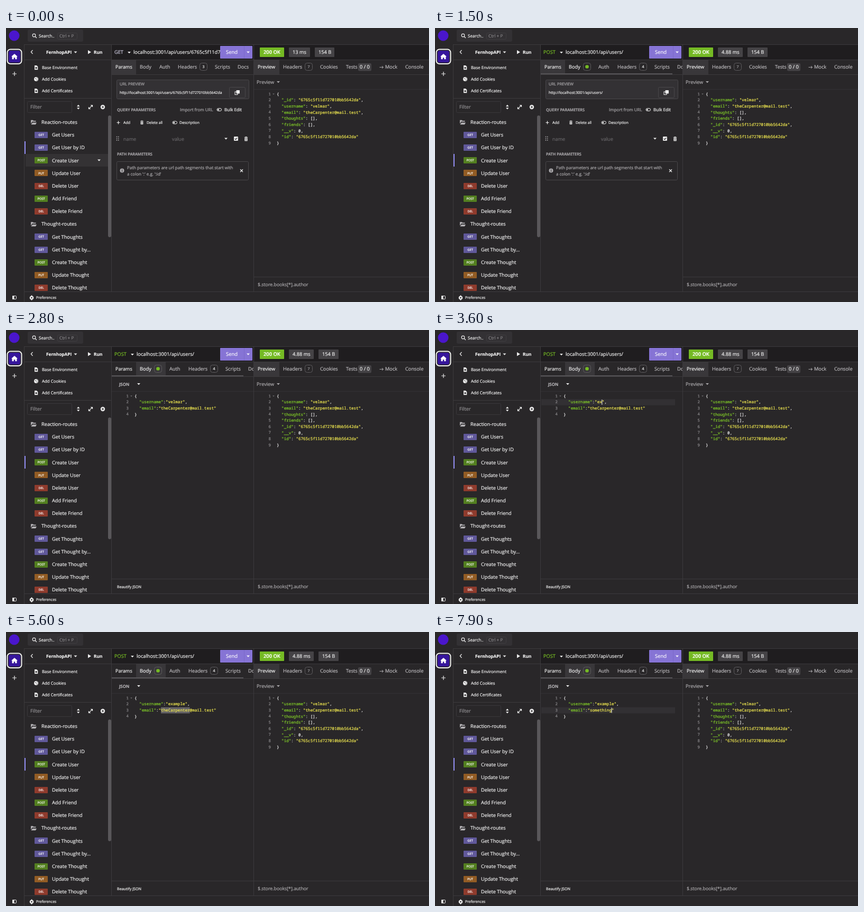
Write an HTML page that moves like this. It is 800x520 px and loops after 8000 ms.

```html
<!DOCTYPE html>
<html lang="en">
<head>
<meta charset="utf-8">
<title>API client</title>
<style>
  html, body { margin: 0; width: 100%; height: 100%; overflow: hidden; background: #292729; }
  svg { display: block; width: 800px; height: 520px; }
  text { font-family: "Open Sans", "Noto Sans", sans-serif; text-rendering: geometricPrecision; stroke-width: .22px; }
  .code { font-family: "Noto Sans Mono", "DejaVu Sans Mono", monospace; }
</style>
</head>
<body>
<svg id="stage" viewBox="0 0 800 520" xmlns="http://www.w3.org/2000/svg"></svg>
<script>
const LOOP = 8000;
const BG = '#292729', BAR = '#1f1d1f', LINE = '#3c3a3d', TEXT = '#ececec', DIM = '#a9a7aa', FAINT = '#666467';
const GREEN = '#75ba24', KEY = '#80cb28', YELLOW = '#f0e850';
const CHAR = 4.55, ROW = 11.65;
const ID = '6765c5f11d727010bb5642da';
const USER = 'velmar', MAIL = 'theCarpenter@mail.test';
const BASE = 'localhost:3001/api/users/';

// y is the middle of the capitals; the thin stroke gives the strong screen weight
const text = (x, y, s, size = 9.24, fill = TEXT, more = '') =>
  `<text x="${x}" y="${y + size * 0.357}" font-size="${size}" fill="${fill}" stroke="${fill}" ${more}>${s}</text>`;
const rect = (x, y, w, h, fill, r = 0, more = '') =>
  `<rect x="${x}" y="${y}" width="${w}" height="${h}" rx="${r}" fill="${fill}" ${more}/>`;
const frameBox = (x, y, w, h, r = 2, fill = 'none', stroke = '#49474a') =>
  rect(x + .5, y + .5, w - 1, h - 1, fill, r, `stroke="${stroke}"`);
const path = (d, stroke = TEXT, width = 1.2, fill = 'none') =>
  `<path d="${d}" stroke="${stroke}" stroke-width="${width}" fill="${fill}"/>`;
const solid = (d, fill = TEXT) => `<path d="${d}" fill="${fill}"/>`;
const dot = (x, y, r, fill = TEXT) => `<circle cx="${x}" cy="${y}" r="${r}" fill="${fill}"/>`;
const caret = (x, y, fill = TEXT, r = 3) =>
  solid(`M${x - r} ${y - r / 2}h${2 * r}l${-r} ${r * 1.1}z`, fill);
const hline = (x, y, w, fill = LINE) => rect(x, y, w, 1, fill);
const vline = (x, y, h) => rect(x, y, 1, h, LINE);
const group = (id, body) => `<g id="${id}">${body}</g>`;
const bold = 'font-weight="700"', semi = 'font-weight="600"', medium = 'font-weight="500"';

const paint = s => s.replace(/"[^"]*"(?=(:?))/g, (q, colon) => {
  const c = colon ? KEY : YELLOW;
  return `<tspan fill="${c}" stroke="${c}">${q}</tspan>`;
});

function code(x, lines, id = '') {
  return lines.map((s, i) => {
    const y = 124.9 + i * ROW, indent = i && i < lines.length - 1 ? 2 * CHAR : 0;
    return text(x - 11, y, i + 1, 7.3, '#8b898c', 'class="code" text-anchor="end"') +
      text(x + indent, y, paint(s), 7.58, TEXT, `class="code" ${id && `id="${id}${i}"`}`);
  }).join('');
}

function badge(x, s, fill = TEXT) {
  return frameBox(x, 66, 15, 15, 4, 'none', '#5c5a5d') +
    (s ? text(x + 7.5, 73.5, s, 7, fill, 'text-anchor="middle"') : dot(x + 7.5, 73.5, 3.3, GREEN));
}

function toggle(x, y) {
  return rect(x - 4, y - 2.5, 8.5, 5, 'none', 2.5, `stroke="${TEXT}"`) + dot(x - 1.3, y, 1.5);
}

function trash(x, y, s = 1) {
  return `<g transform="translate(${x} ${y}) scale(${s})">` +
    rect(-3.5, -4, 7, 1.3, TEXT) + rect(-1.2, -5, 2.4, 1, TEXT) +
    rect(-3, -2, 6, 6.5, TEXT, 1) + path('M-1-1v4.5M1-1v4.5', BG, .7) + '</g>';
}

function rail() {
  return dot(15.5, 14.5, 10, '#4a16cc') +
    rect(2.5, 40.5, 27, 27.5, BG, 6, 'stroke="#f2f2f4" stroke-width="2"') +
    rect(5, 43, 22, 22.5, '#36169c', 3.5) +
    solid('M16 49l6 5.3h-1.5v5h-3.2v-3h-2.6v3h-3.2v-5h-1.5z', '#fff') +
    path('M12 87h8M16 83v8') +
    frameBox(12, 508, 8, 7, 1, 'none', TEXT) + rect(12, 508, 3.5, 7, TEXT, 1);
}

function topBar() {
  return rect(41, 3, 105, 23, '#333134', 3) +
    `<circle cx="53" cy="14" r="2.8" fill="none" stroke="${TEXT}" stroke-width="1.2"/>` + path('M55 16l3 3') +
    text(62, 15, 'Search..', 8.1) + frameBox(97, 9, 38, 13, 2, 'none', '#3f3d40') +
    text(101, 15.5, 'Ctrl + P', 8.2, '#858386');
}

function sidebar() {
  const colors = { GET: '#60589a', POST: '#537f20', PUT: '#925c24', DEL: '#8f3b2d' };
  const rows = ['Reaction-routes', 'GET Get Users', 'GET Get User by ID', 'POST Create User',
    'PUT Update User', 'DEL Delete User', 'POST Add Friend', 'DEL Delete Friend',
    'Thought-routes', 'GET Get Thoughts', 'GET Get Thought by...', 'POST Create Thought',
    'PUT Update Thought', 'DEL Delete Thought'];
  const list = rows.map((row, i) => {
    const y = 178.8 + i * 24.17, [, verb, name] = row.match(/^(?:([A-Z]+) )?(.*)$/);
    if (!verb) {
      return solid(`M47 ${y - 4}h4l1 1.3h4.5v1.7h-7l-2.5 4zM50 ${y + .8}h8l-2 3.6h-8.5z`, '#b5b3b6') +
        text(67, y, name);
    }
    return rect(54, Math.round(y - 6), 25, 12, colors[verb], 1) +
      text(66.6, y, verb, 5.7, '#fff', 'text-anchor="middle"') + text(87, y, name);
  }).join('');

  const page = y => solid(`M54 ${y - 4}h4l2.3 2.3v6h-6.3z`) + rect(55.5, y - .5, 3.2, 2.6, BG);
  return path('M50.5 42l-3.2 3.5 3.2 3.5') + text(76, 46, 'FernhopAPI', 8.3, TEXT, bold) + caret(131.5, 46) +
    solid('M155 42l6 3.8-6 3.8z') + text(166, 46, 'Run', 8.4, TEXT, bold) +
    page(75) + text(68, 75, 'Base Environment', 7.9, TEXT, medium) +
    dot(57, 97, 4) + dot(55.7, 96, .8, BG) + dot(58.5, 98.5, .8, BG) + dot(58.8, 95, .7, BG) +
    text(68, 97, 'Add Cookies', 7.9, TEXT, medium) +
    page(119) + text(68, 119, 'Add Certificates', 7.9, TEXT, medium) +
    frameBox(40, 139, 85, 22, 2, 'none', '#3a383b') + text(46, 150, 'Filter', 9.24, '#8f8d90') +
    solid('M134 149l2.8-3.4 2.8 3.4zM134 151.200l2.8 3.4 2.8-3.4z') +
    path('M157 153l6-6M160 146.500h3.500v3.500M156.500 150v3.500h3.500') +
    dot(183, 150, 4.2) + path('M180.800 150h4.400M183 147.800v4.400', BG, 1.1) +
    hline(35, 60, 165) + hline(35, 133, 165) +
    `<g clip-path="url(#listClip)">` +
    rect(37, 215, 156, 24, '#fff', 0, 'id="rowGet" opacity="0"') +
    rect(37, 239, 156, 24, '#fff', 0, 'id="rowCreate" opacity="0"') +
    rect(35, 215, 2, 24, '#8f8af0', 0, 'id="barGet"') +
    rect(35, 239, 2, 24, '#8f8af0', 0, 'id="barCreate"') +
    list + group('rowCaret', caret(176, 251)) + '</g>' +
    rect(193, 166, 6, 231, '#59575a', 3);
}

function request() {
  const tab = (x, s) => text(x, 74, s, 9.24, '#b9b7ba');
  const getHead = text(205, 46, 'GET', 9.24, '#cbc8dc') + caret(233, 46.5) + text(241, 46, BASE + ID.slice(0, 11)) +
    tab(253, 'Body') + tab(290, 'Auth') + tab(325, 'Headers') + badge(366, '3') +
    tab(395, 'Scripts') + tab(438, 'Docs');
  const postHead = text(205, 46, 'POST', 9.24, GREEN) + caret(239, 46.5) + text(247, 46, BASE) +
    tab(309, 'Auth') + tab(345, 'Headers') + badge(386, '4') + tab(415, 'Scripts') + tab(458, 'Docs') +
    text(253, 74, 'Body') + badge(280, '') + rect(200, 86, 249, 2, '#555356');

  const params = frameBox(209, 98, 251, 37, 2, '#333134') +
    text(215, 106, 'URL PREVIEW', 7.5, '#a9a7aa') +
    group('previewGet', text(215, 123, 'http://' + BASE + ID, 6.85)) +
    group('previewPost', text(215, 123, 'http://' + BASE, 6.95)) +
    frameBox(422, 112, 31, 21) +
    group('copy', rect(433, 121, 5, 5.5, 'none', 0, `stroke="${TEXT}"`) + rect(435.5, 118, 6.5, 6.5, TEXT, 1)) +
    text(210, 155, 'QUERY PARAMETERS', 7.4, '#b0aeb1', semi) + text(329, 155.500, 'Import from URL', 8, DIM) +
    toggle(403, 155) + text(413, 155.500, 'Bulk Edit', 8.1) +
    path('M209.500 179.500h6M212.500 176.500v6') + text(222, 179.500, 'Add', 7) +
    trash(257, 179.500, .8) + text(266, 179.500, 'Delete all', 6.95) +
    toggle(319, 179.500) + text(328, 179.500, 'Description', 7.1) +
    [206.5, 209.8, 213].map(y => dot(209.5, y, .9, DIM) + dot(212.7, y, .9, DIM)).join('') +
    text(222, 210.500, 'name', 9.1, FAINT) + text(314, 210.500, 'value', 9.24, FAINT) +
    caret(416, 210) + rect(431, 206, 8, 8, TEXT, 1.2) + path('M432.800 210l1.600 1.700 3-3.400', BG, 1.1) + trash(454, 210.500, .9) +
    text(210, 239, 'PATH PARAMETERS', 7.4, '#b0aeb1', semi) +
    frameBox(209, 253, 250, 36) +
    dot(219.5, 270.5, 4, DIM) + rect(219, 270, 1.1, 2.8, BG) + rect(219, 268, 1.1, 1.2, BG) +
    text(229, 265.500, 'Path parameters are url path segments that start with', 8, DIM) +
    text(229, 277.500, "a colon ':' e.g. ':id'", 8, DIM) +
    path('M443 268.200l5 5M448 268.200l-5 5', TEXT, 1.3);

  const body = text(214, 103, 'JSON', 7.9, '#c6c4c7', semi) + caret(251, 102.5) + hline(200, 116, 269, '#333134') +
    rect(201, 131, 253, 11.65, '#323033', 0, 'id="activeLine"') +
    rect(293, 131, 0, 11.65, '#646266', 0, 'id="selection"') +
    code(243, ['{', '"username":"' + USER + '",', '"email":"' + MAIL + '"', '}'], 'edit') +
    group('fold', caret(237, 125.5, '#777578', 1.8)) +
    rect(0, 132, 1, 10, '#f0f0f0', 0, 'id="cursor"') +
    hline(200, 472, 269) + text(210, 487, 'Beautify JSON', 7.15, TEXT, medium);

  return rect(200, 32, 269, 28, BAR) +
    rect(200, 61, 46, 27, '#39373a', 0, 'id="tabParams"') + rect(246, 61, 56, 27, '#39373a', 0, 'id="tabBody"') +
    text(207, 74, 'Params', 9.1) + group('getHead', getHead) + group('postHead', postHead) +
    group('params', params) + group('body', body) +
    rect(405, 34, 61, 24, '#8674d5', 1) + rect(450, 34, 1, 24, '#7b69c9') +
    text(416, 46, 'Send', 9.4, '#f4f2fb') + caret(458, 46, '#f4f2fb');
}

function response() {
  const quote = s => `"${s}"`;
  const who = ['"username": ' + quote(USER) + ',', '"email": ' + quote(MAIL) + ',', '"thoughts": [],', '"friends": [],'];
  const id = '"_id": ' + quote(ID) + ',', tail = ['"__v": 0,', '"id": ' + quote(ID), '}'];
  const chip = (x, w, s) => rect(x, 37, w, 18, '#454346', 1) + text(x + 7, 46, s);
  const tab = (x, s) => text(x, 74, s, 9.24, '#b9b7ba');
  return rect(469, 32, 331, 468, BG) + rect(469, 32, 331, 28, BAR) +
    rect(480, 37, 46, 18, GREEN, 1) + text(487, 46, '200 OK', 9.4, '#fff', semi) +
    rect(469, 61, 48, 27, '#39373a') + text(476, 74, 'Preview') +
    tab(524, 'Headers') + badge(565, '7', DIM) + tab(594, 'Cookies') + tab(643, 'Tests') +
    rect(666, 67, 25, 14.5, '#454346', 2) + text(669, 74, '0 / 0') +
    path('M706.500 74.500h7M711 72l2.500 2.500-2.500 2.500', '#b9b7ba', .9) + tab(717, 'Mock') + tab(755, 'Console') +
    text(474, 102.500, 'Preview', 9.24, DIM) + caret(515, 102.5, DIM) + hline(469, 116, 331, '#333134') +
    group('resGet', chip(535, 40, '13 ms') + chip(584, 37, '154 B') + code(512, ['{', id, ...who, ...tail])) +
    group('resPost', chip(535, 47, '4.88 ms') + chip(591, 38, '154 B') + code(512, ['{', ...who, id, ...tail])) +
    group('resFold', caret(506, 125.5, '#777578', 1.8)) +
    hline(469, 472, 331) + text(476, 487, '$.store.books[*].author', 8.75, DIM);
}

const stage = document.getElementById('stage');
stage.innerHTML = '<defs><clipPath id="listClip"><rect x="34" y="166" width="166" height="333"/></clipPath></defs>' +
  rect(0, 0, 800, 520, BG) + rail() + topBar() + sidebar() + request() + response() +
  hline(35, 31, 765) + hline(200, 60, 600) + hline(200, 88, 600) + hline(35, 500, 765) +
  vline(34, 31, 489) + vline(199, 31, 469) + vline(468, 31, 469) +
  solid('M45.500 509.500l2-1 .3-1.300h1.400l.3 1.300 2 1 .9 2.500-.9 2.500-2 1-.3 1.300h-1.400l-.3-1.300-2-1-.9-2.500z') +
  dot(48.5, 512, 1.3, BG) + text(57, 512, 'Preferences', 6.95);

const node = Object.fromEntries([...stage.querySelectorAll('[id]')].map(n => [n.id, n]));
const show = (id, on) => node[id].setAttribute('visibility', on ? 'inherit' : 'hidden');
const put = (id, attrs) => { for (const k in attrs) node[id].setAttribute(k, attrs[k]); };
// value of the last step already reached
const at = (steps, t) => steps.reduce((v, [time, next]) => t >= time ? next : v, steps[0][1]);

const rowCreate = [[0, .05], [400, .08], [600, .11], [900, .09], [1500, 0]];
const rowGet = [[0, 0], [500, .06], [600, .03], [700, 0]];
const pickUser = [[0, 0], [3100, 1], [3200, 3], [3300, 5], [3400, 6], [3500, 0]];
const pickMail = [[0, 0], [5300, 2], [5400, 5], [5500, 9], [5600, 12], [5700, 17], [5800, 20], [6000, 21], [6100, 22], [6700, 0]];
const userKeys = [3500, 3600, 3700, 3800, 3900, 4000, 4100];
const mailKeys = [6700, 6900, 7100, 7300, 7500, 7600, 7700, 7800, 7900];
const typed = (word, keys, before, t) =>
  t < keys[0] ? before : word.slice(0, keys.filter(k => t >= k).length);

function draw(t) {
  const post = t >= 500, body = t >= 1700;
  for (const id of ['getHead', 'previewGet', 'resGet']) show(id, !post);
  for (const id of ['postHead', 'previewPost', 'resPost']) show(id, post);
  show('params', !body);
  show('body', body);
  show('tabParams', !body);
  show('tabBody', t >= 1600);
  put('tabBody', { opacity: body ? 1 : .5 });
  put('copy', { opacity: t >= 500 && t < 700 ? .5 : 1 });
  show('resFold', t < 500 || t >= 1100);

  put('rowCreate', { opacity: at(rowCreate, t) });
  put('rowGet', { opacity: at(rowGet, t) });
  show('rowCaret', t < 1500);
  show('barGet', t < 700);
  show('barCreate', post);

  const user = typed('example', userKeys, USER, t), mail = typed('something', mailKeys, MAIL, t);
  node.edit1.innerHTML = paint(`"username":"${user}",`);
  node.edit2.innerHTML = paint(`"email":"${mail}"`);
  show('fold', t >= 2600);

  const second = t >= 5200, top = second ? 142.8 : 131.2;
  const start = 252.1 + (second ? 9 : 12) * CHAR;
  const picked = at(second ? pickMail : pickUser, t);
  const editing = body && t >= 3000 && !picked;
  const count = second ? (t >= 6700 ? mail.length : 0) : (t >= 3500 ? user.length : 0);
  put('selection', { x: start, y: top, width: picked * CHAR });
  put('activeLine', { y: top });
  put('cursor', { x: start + count * CHAR - .5, y: top + .8 });
  show('activeLine', editing);
  show('cursor', editing && !(t >= 4600 && t < 5100));
}

let last = -1;
function tick() {
  const t = Math.floor(performance.now() % LOOP / 100) * 100;
  if (t !== last) draw(last = t);
  requestAnimationFrame(tick);
}
tick();
</script>
</body>
</html>
```
